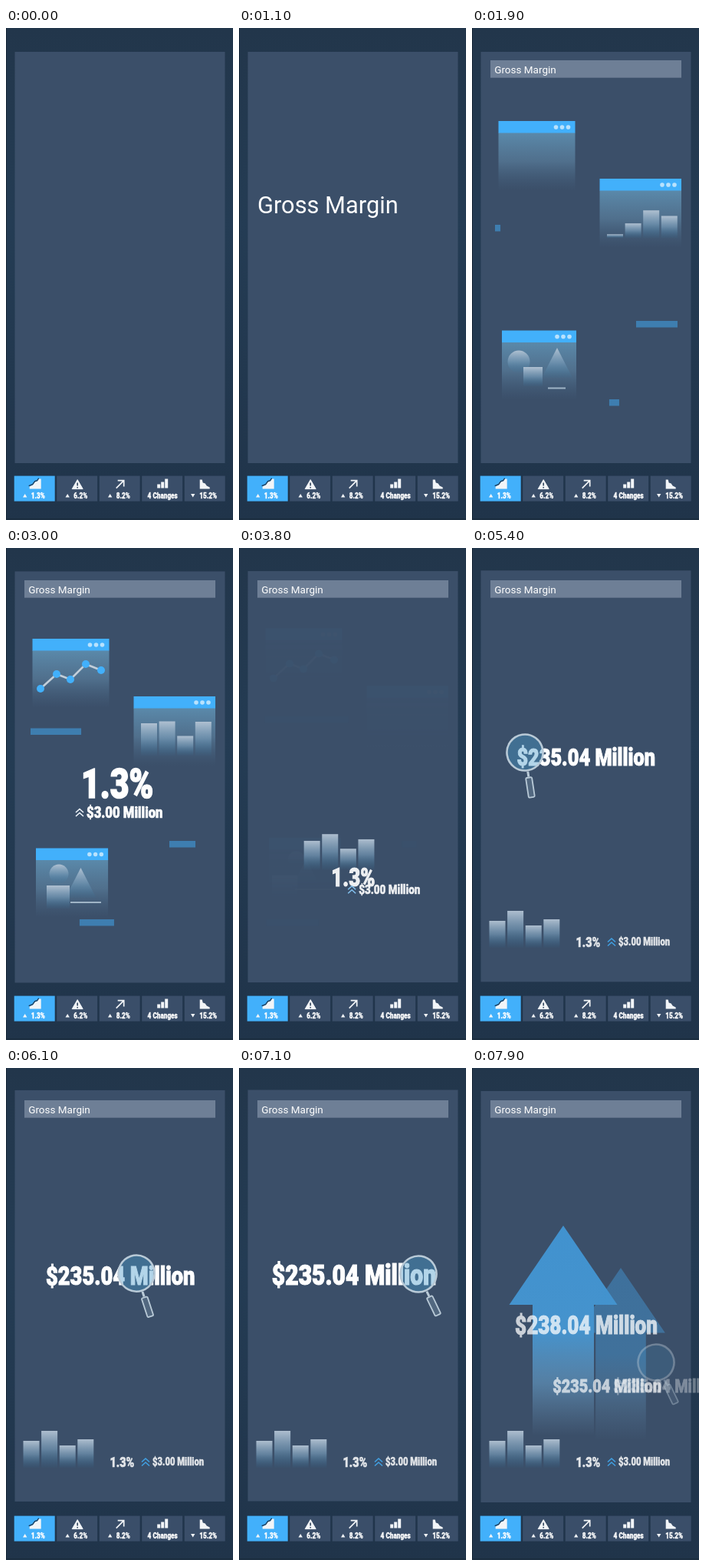
Animation, 296 px wide and 640 px high, one loop 8 s. Source, as an HTML page:

```html
<!DOCTYPE html>
<html lang="en">
<head>
<meta charset="utf-8">
<title>Gross Margin</title>
<style>
html, body { margin: 0; width: 100%; height: 100%; overflow: hidden; background: #22374e; }
svg { display: block; width: 100vw; height: 100vh; }
text { font-family: Roboto, "Open Sans", sans-serif; fill: #fff; }
.heavy { font-size: 21.6px; font-weight: 900; stroke: #fff; stroke-width: .7; }
.mid { text-anchor: middle; }
</style>
</head>
<body>
<svg viewBox="0 0 296 640" preserveAspectRatio="none">
  <defs>
    <linearGradient id="bg" x2="0" y2="1">
      <stop offset="0" stop-color="#22364b"/><stop offset=".4" stop-color="#243c54"/><stop offset="1" stop-color="#20344a"/>
    </linearGradient>
    <linearGradient id="body" x2="0" y2="1">
      <stop offset="0" stop-color="#6298bb" stop-opacity=".8"/>
      <stop offset=".5" stop-color="#6590b0" stop-opacity=".5"/>
      <stop offset="1" stop-color="#4f7293" stop-opacity="0"/>
    </linearGradient>
    <linearGradient id="pale" x2="0" y2="1">
      <stop offset="0" stop-color="#b4c4d4" stop-opacity=".95"/>
      <stop offset=".5" stop-color="#7599b6" stop-opacity=".7"/>
      <stop offset="1" stop-color="#34729b" stop-opacity=".05"/>
    </linearGradient>
    <linearGradient id="blue" x2="0" y2="1">
      <stop offset="0" stop-color="#4192cf"/><stop offset=".5" stop-color="#4593cd"/>
      <stop offset=".75" stop-color="#6298c2" stop-opacity=".65"/>
      <stop offset="1" stop-color="#6a94b8" stop-opacity="0"/>
    </linearGradient>
    <path id="arrow" d="M0 0L70.5 103H40V273H-40V103H-70.5Z"/>
  </defs>
  <rect width="296" height="640" fill="url(#bg)"/>
  <path d="M.5 0V638.8H296" fill="none" stroke="#182838"/>
  <rect id="panel" x="11.5" width="274" height="535" fill="#3b4f69"/>
  <rect id="bar" x="24" y="42" width="249" height="22.7" fill="#6e7f96"/>
  <text id="title">Gross Margin</text>
  <g id="wins"></g>
  <g id="dashes" fill="#3e7eb0"></g>
  <g id="line">
    <path id="trend" fill="none" stroke="#c3cfda" stroke-width="2.6"/>
    <g id="dots" fill="#42b0fb"></g>
  </g>
  <g id="shapes" fill="url(#pale)">
    <circle id="disc"/><path id="tri" d="M0 0L20 39H-20Z"/><rect id="box"/><rect id="rule" height="2" fill="#9fb4c6"/>
  </g>
  <g id="bars" fill="url(#pale)"></g>
  <g id="arrows" fill="url(#blue)">
    <use id="front" href="#arrow"/><use id="back" href="#arrow" opacity=".5"/>
  </g>
  <text id="pct" class="heavy">1.3%</text>
  <path id="chev" d="M-5 0L0-4.5L5 0M-5 5L0 .5L5 5" fill="none" stroke-width="1.6"/>
  <text id="gain" class="heavy">$3.00 Million</text>
  <text id="ghost" class="heavy mid">$235.04 Million</text>
  <text id="total" class="heavy mid">$235.04 Million</text>
  <text id="next" class="heavy mid">$238.04 Million</text>
  <g id="lens" stroke="#b9cad7">
    <circle r="23.5" fill="#4a9cca" fill-opacity=".42" stroke-width="2.6"/>
    <path d="M0 25V32" stroke-width="3"/>
    <rect x="-4" y="33" width="8" height="26" rx="1.5" fill="#7d97ac" fill-opacity=".35" stroke-width="1.8"/>
  </g>
  <g id="nav" transform="translate(10.7 582.6)"></g>
</svg>
<script>
const LOOP = 8000, NARROW = .8;
const $ = id => document.getElementById(id);
const set = (el, attrs) => { for (const k in attrs) el.setAttribute(k, attrs[k]); };
const clamp = u => Math.max(0, Math.min(1, u));
const smooth = u => u * u * (3 - 2 * u);
const part = (t, from, to) => clamp((t - from) / (to - from));
const ramp = (t, from, to) => smooth(part(t, from, to));
const mix = (a, b, u) => Array.isArray(a) ? a.map((v, i) => mix(v, b[i], u)) : a + (b - a) * u;

function put(id, [x, y, size], opacity) {
  set($(id), { transform: `translate(${x} ${y}) scale(${size / 20 * NARROW} ${size / 20})`, opacity });
}

function make(parent, tag, count, attrs = {}) {
  return Array.from({ length: count }, () => {
    const el = document.createElementNS('http://www.w3.org/2000/svg', tag);
    set(el, attrs);
    return $(parent).appendChild(el);
  });
}

const dashes = make('dashes', 'rect', 3, { height: 8.5 });
const dots = make('dots', 'circle', 5);
const bars = make('bars', 'rect', 4, { width: 21 });

const frames = [[34.5, 121, 100], [166.5, 196, 106.5], [39, 393.5, 97]];
const wins = make('wins', 'g', 3);
wins.forEach((g, i) => {
  const w = frames[i][2];
  g.innerHTML = `<rect y="15" width="${w}" height="75" fill="url(#body)"/>
    <rect width="${w}" height="15.5" fill="#42b0fb"/>` +
    [25, 17, 9].map(d => `<circle cx="${w - d}" cy="8" r="2.8" fill="#b9e2fd"/>`).join('');
});

// Label, direction of the marker, icon around its centre
const tabs = [
  ['1.3%', 1, '<path d="M-7 6V3L-3 1L0-3L3-4L5-7H8V6Z"/><path d="M-8 2L-3 0L0-4L3-5L5-8" fill="none" stroke="#1f3a55" stroke-width="1.3"/>'],
  ['6.2%', 1, '<path d="M0-6L7 6H-7Z" stroke="#f2f5f8" stroke-linejoin="round"/><path d="M0-2V2M0 3.4V5" stroke="#33475f" stroke-width="1.6"/>'],
  ['8.2%', 1, '<path d="M-5 5L5-5M-3-5H5V3" fill="none" stroke="#f2f5f8" stroke-width="1.7"/>'],
  ['4 Changes', 0, '<path d="M-7 0H-3V5H-7ZM-2-3H2V5H-2ZM3-7H7V5H3Z"/>'],
  ['15.2%', -1, '<path d="M-7-6H-4L-3-2L0-1L2 2L6 4V6H-7Z"/>']
];
$('nav').innerHTML = tabs.map(([label, dir, icon], i) => `
  <g transform="translate(${i * 55.5} 0)" fill="#f2f5f8">
    <rect width="53" height="33" fill="${i ? '#3a4e69' : '#42b0fb'}"/>
    <g transform="translate(27 11)">${icon}</g>
    <path transform="translate(${dir < 0 ? 11 : 14} 25.7) scale(1 ${dir})" d="M-2.7 2.2L0-2.2L2.7 2.2Z"/>
    <text class="heavy mid" transform="translate(${dir ? 31 : 27} 29) scale(${.475 * NARROW} .475)">${label}</text>
  </g>`).join('');

function drawTitle(t) {
  const enter = ramp(t, 500, 1100), dock = ramp(t, 1550, 1850);
  const [x, y, size] = mix([24, 296 - 55 * enter, 30.8], [29.2, 58.8, 13.5], dock);
  set($('title'), { x, y, 'font-size': size, opacity: enter });
  set($('bar'), { opacity: dock });
  set($('panel'), { y: 31 - 2.5 * part(t, 1900, 7000) + 1.5 * ramp(t, 7250, 7850) });
}

function drawWindows(t) {
  const age = (t - 1900) / 1100;
  const opacity = ramp(t, 1550, 1800) - ramp(t, 3350, 3850);
  const lift = 30 - 30 * ramp(t, 1550, 1850) - 3 * clamp(age) - 14 * ramp(t, 3350, 3850);
  const moved = { transform: `translate(0 ${lift})`, opacity };

  wins.forEach((g, i) => {
    const [x, y] = frames[i], squeeze = i > 1 ? 1 - .03 * clamp(age) : 1;
    set(g, { transform: `translate(${x} ${y + lift}) scale(${squeeze} 1)`, opacity });
  });

  // Dashes slide between two places: x, y, width
  const slide = [
    mix([30, 256, 7], [32, 234.5, 66], age),
    mix([214, 381, 54], [213, 381, 34], age),
    mix([179, 483, 13], [96, 483, 45], age)
  ];
  dashes.forEach((el, i) => {
    const [x, y, w] = slide[i];
    set(el, { x, y, width: Math.max(0, w), opacity });
  });

  const pts = [[45, 186], [66, 167], [84, 174], [104, 154], [124, 162]];
  const reach = 5.2 * part(t, 1950, 2750) - .2, path = [];
  pts.forEach(([cx, cy], i) => {
    set(dots[i], { cx, cy, r: 5 * ramp(reach, i - .2, i + .2) });
    if (i <= reach) path.push([cx, cy]);
    else if (i && i - reach < 1) path.push(mix(pts[i - 1], pts[i], reach - i + 1));
  });
  set($('trend'), { d: path.length ? 'M' + path.join('L') : '' });
  set($('line'), moved);

  const [cx, cy, r] = mix([61, 434, 14.5], [69, 427, 12.5], age);
  const [x, y, width] = mix([67, 441, 25], [53, 442, 30], age);
  const [rx, ry, rw] = mix([99, 467.5, 23], [84, 463, 40], age);
  set($('disc'), { cx, cy, r });
  set($('box'), { x, y, width, height: width });
  set($('rule'), { x: rx, y: ry, width: rw });
  set($('tri'), { transform: `translate(${111 - 13.5 * age} ${416 + 3 * age})` });
  set($('shapes'), moved);
}

function drawBars(t) {
  const age = part(t, 1900, 3000), fly = ramp(t, 3350, 4150);
  const swing = (17 - 10 * age) * (1 - fly), phase = (1 - age) * Math.PI * 2 / 3;
  const [x, base] = mix([176, 273 - 3 * age], [22.5, 520], fly);
  [35, 48, 29, 37].forEach((rest, i) => {
    const grow = clamp((t - 1830) / 400 + i * .3);
    const height = grow * (rest + swing * Math.cos(i * Math.PI * 2 / 3 + phase));
    set(bars[i], { x: x + i * 23.6, y: base - height, height });
  });
  set($('bars'), { opacity: ramp(t, 1600, 1800) });
}

function drawGain(t) {
  const enter = ramp(t, 2300, 2750), follow = ramp(t, 2450, 2850), fly = ramp(t, 3350, 4150);
  const dim = 1 - .14 * fly, drop = 11 * (1 - follow);
  const [x, y] = mix([96, 344 + drop], [182, 512.5], fly);
  put('pct', mix([98, 325, 34 + 15.5 * enter], [135.5, 519, 16.7], fly), enter * dim);
  put('gain', mix([105, 351 + drop, 19.3], [191, 517, 13], fly), follow * dim);
  set($('chev'), {
    transform: `translate(${x} ${y})`,
    stroke: `rgb(${mix([240, 246, 252], [66, 172, 245], fly)})`,
    opacity: follow * dim
  });
}

function drawTotal(t) {
  const rise = ramp(t, 4250, 5150), zoom = part(t, 5150, 7100), fall = ramp(t, 7250, 7850);
  const held = [148.5 + 1.5 * zoom, 440 - 157 * rise - 1.5 * zoom, 25.5 + 3 * rise + 6.3 * zoom];
  put('total', mix(held, [176, 422, 23], fall), .7 * part(t, 4250, 4700) + .3 * ramp(t, 4600, 5000) - .32 * fall);
  put('ghost', mix(held, [255, 422, 23], fall), .34 * ramp(t, 7250, 7500));

  const enter = ramp(t, 5050, 5400), sweep = ramp(t, 5400, 6700);
  const x = -45 + 114 * enter + 181 * sweep - 16 * ramp(t, 6700, 7050) + 6 * fall;
  const y = 266 + 2 * sweep + 115 * fall;
  set($('lens'), { transform: `translate(${x} ${y}) rotate(${-8.7 - 17 * sweep})`, opacity: enter - .58 * fall });
}

function drawRise(t) {
  const enter = ramp(t, 7350, 7880), drop = 130 * (1 - enter);
  set($('front'), { transform: `translate(119 ${205 + drop})` });
  set($('back'), { transform: `translate(194 ${260 + drop * .7}) scale(.82)` });
  set($('arrows'), { opacity: enter });
  put('next', [149, 346 + drop * .6, 30.2], enter * .74);
}

const scenes = [drawTitle, drawWindows, drawBars, drawGain, drawTotal, drawRise];
const began = performance.now();
function tick() {
  const t = (performance.now() - began) % LOOP;
  scenes.forEach(draw => draw(t));
  requestAnimationFrame(tick);
}
tick();
</script>
</body>
</html>
```
